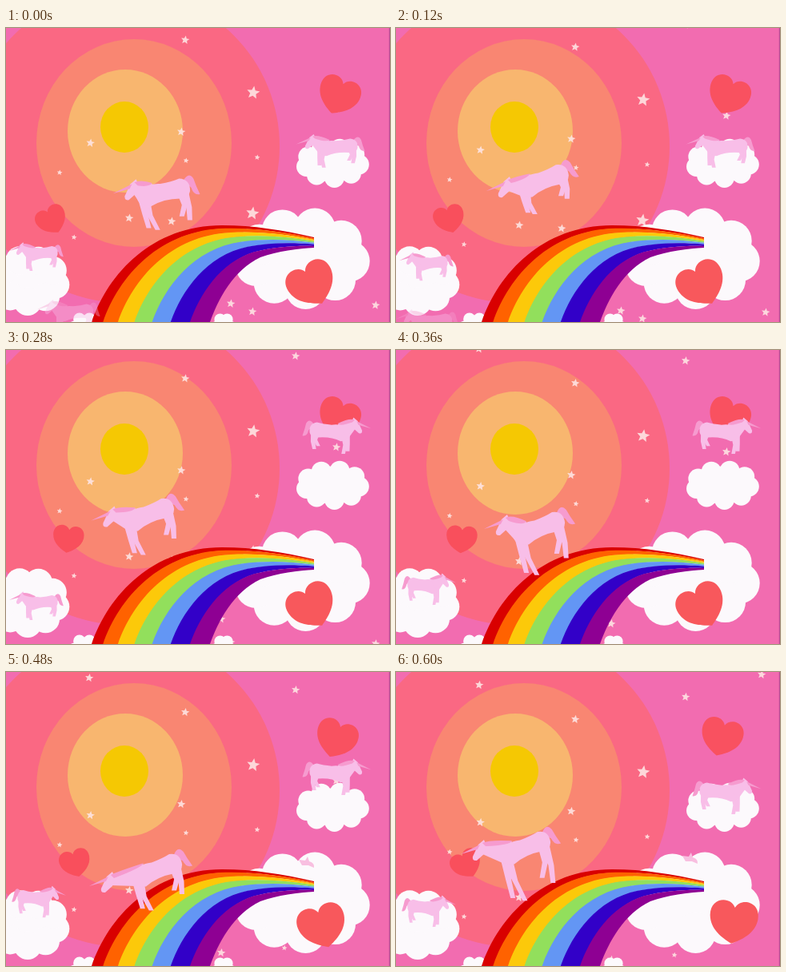
These frames come from a looping animation (480 by 368 pixels, 0.64 s). An HTML page:

```html
<!DOCTYPE html>
<html lang="en">
<head>
<meta charset="utf-8">
<title>Rainbow unicorns</title>
<style>
html, body { margin: 0; width: 100%; height: 100%; overflow: hidden; background: #f26cb0; }
svg { display: block; width: 100vw; height: 100vh; }
</style>
</head>
<body>
<svg id="stage" viewBox="0 0 480 368" preserveAspectRatio="none"></svg>
<script>
const NS = "http://www.w3.org/2000/svg";
const stage = document.getElementById("stage");
const LOOP = 640, STEP = 40, LAST = LOOP / STEP - 1;

function add(tag, attrs, parent = stage) {
  const el = document.createElementNS(NS, tag);
  for (const name in attrs) el.setAttribute(name, attrs[name]);
  return parent.appendChild(el);
}

const mix = (a, b, k) => a + (b - a) * k;
const rad = degrees => degrees * Math.PI / 180;
const ramp = (from, to, v) => Math.min(1, Math.max(0, (v - from) / (to - from)));
const place = (el, x, y, rest = "") => el.setAttribute("transform", `translate(${x},${y}) ${rest}`);
const show = (el, on) => el.setAttribute("visibility", on ? "visible" : "hidden");

// Sky
function disc(cx, cy, rx, ry, fill) {
  add("ellipse", { cx, cy, rx, ry, fill });
}
add("rect", { width: 480, height: 368, fill: "#f26cb0" });
disc(147, 148, 195, 196, "#fa6883");
disc(160, 144, 122, 130, "#f98672");
disc(149, 129, 72, 77, "#f8b66f");
disc(148, 124, 30, 32, "#f5c803");

// Stars fall at one common speed
const FALL = 2.95;
function starPath(r) {
  const points = Array.from({ length: 10 }, (_, i) => {
    const a = i * Math.PI / 5 - 1.42, d = i % 2 ? r * 0.45 : r;
    return `${d * Math.cos(a)},${d * Math.sin(a)}`;
  });
  return `M${points.join("L")}Z`;
}
function makeStars(r, places) {
  return places.map(([x, y]) =>
    ({ x, y, el: add("path", { d: starPath(r), fill: "#fde3e2", opacity: 0.9 }) }));
}
const stars = [
  ...makeStars(3.6, [[225, 166], [314, 162], [67, 181], [85, 262], [348, 310]]),
  ...makeStars(5.5, [[224, 15], [219, 130], [105.5, 144], [154, 238], [207, 242], [362, -13],
    [104, -28], [457, -41], [462, 347], [281, 345], [308, 355], [269, 316], [413, 101]]),
  ...makeStars(8.5, [[309, 81], [308, 232]])
];

const HEART = "M0,-17C-6,-31-32,-28-30,-5C-28,13-12,22 0,28C12,22 28,13 30,-5C32,-28 6,-31 0,-17Z";
const heart = fill => add("path", { d: HEART, fill });
const highHeart = heart("#f95160"), driftHeart = heart("#f94f5c");

// A cloud is an oval with a ring of lobes
function cloud(cx, cy, rx, ry, lobes, turn = 0) {
  const r = ry * 0.4;
  const g = add("g", { fill: "#fcf9fc" });
  add("ellipse", { cx, cy, rx: rx - r * 0.6, ry: ry - r * 0.6 }, g);
  for (let i = 0; i < lobes; i++) {
    const a = turn + i * 2 * Math.PI / lobes;
    add("circle", { cx: cx + (rx - r) * Math.cos(a), cy: cy + (ry - r) * Math.sin(a), r }, g);
  }
}
cloud(408, 169, 46, 31, 9, 0.1);
cloud(370, 288, 85, 64, 9, 0.1);
cloud(28, 316, 52, 44, 9, 0.2);
cloud(98, 374, 20, 19, 6);
cloud(272, 374, 16, 18, 6);

const peeker = add("path", { d: "M-9,-2L-1,-1L2,-6L4,0Q11,2 10,8L3,5L-5,5Z", fill: "#f8bfe0" });
const lowHeart = heart("#f8585c");

// Rainbow: each edge blends the outer and the inner curve
const outer = [107, 368, 128, 307, 183, 247, 270, 247, 310, 247, 345, 253, 385, 262];
const inner = [255, 368, 265, 340, 284, 303, 318, 287, 340, 279, 365, 276, 385, 275];
const edge = i => outer.map((v, j) => mix(v, inner[j], (i / 7) ** 1.2));
const curve = p => `${p[0]},${p[1]}C${p.slice(2)}`;
const backwards = p => p.map((_, i) => p[p.length - 2 - i + 2 * (i % 2)]);
["#d90000", "#ff6200", "#fcc90a", "#92df5c", "#6396f4", "#3200c8", "#8e0093"].forEach((fill, i) => {
  const lower = edge(Math.min(7, i + 1.05));
  add("path", { fill, d: `M${curve(edge(i))}L${curve(backwards(lower))}Z` });
});

// Unicorn facing left, posed by body centre, tilt, head offset and leg reach
function unicorn(opacity = 1) {
  const g = add("g", { opacity });
  const part = fill => add("path", { fill }, g);
  const skin = "#f8bee8", pink = "#f69bcf";
  const tail = part(pink);
  const legs = Array.from({ length: 4 }, () => part(skin));
  const torso = part(skin), neck = part(skin), head = part(skin);
  const mane = part(pink), horn = part(pink);
  const draw = (el, d) => el.setAttribute("d", d);

  function leg(el, [x, y], swing, length, bend) {
    const fx = x + Math.sin(rad(swing)) * length, fy = y + Math.cos(rad(swing)) * length;
    const kx = mix(x, fx, 0.55) + bend, ky = mix(y, fy, 0.55);
    draw(el, `M${x - 8},${y}L${x + 7},${y}L${kx + 3.5},${ky}L${fx + 3},${fy}` +
      `L${fx - 3},${fy}L${kx - 3.5},${ky}Z`);
  }

  function pose({ x, y, tilt, hx, hy, reach, swing }) {
    const c = Math.cos(rad(tilt)), s = Math.sin(rad(tilt));
    const at = (a, b) => [x + a * c - b * s, y + a * s + b * c];
    const fore = at(-22, 4), hind = at(27, 1);
    const near = (a, b) => [fore[0] + hx + a, fore[1] + hy + b];

    leg(legs[0], fore, swing, reach, -2);
    leg(legs[1], fore, swing - 14, reach * 0.88, -2);
    leg(legs[2], hind, swing * 0.6, reach * 0.85, 3);
    leg(legs[3], hind, swing * 0.6 - 16, reach * 0.72, 3);
    draw(torso, `M${at(-31, -2)}Q${at(-18, -14)} ${at(0, -11)}Q${at(14, -12)} ${at(24, -15)}` +
      `Q${at(38, -13)} ${at(36, 2)}Q${at(33, 12)} ${at(23, 10)}Q${at(2, 8)} ${at(-15, 16)}` +
      `Q${at(-33, 14)} ${at(-31, -2)}Z`);
    draw(neck, `M${near(1, -4)}L${at(-10, -12)}L${at(-27, 12)}L${near(-1, 8)}Z`);
    draw(head, `M${near(3, -9)}L${near(-4, -3)}L${near(-11, 12)}Q${near(-12, 18)} ${near(-6, 17)}` +
      `L${near(3, 9)}L${near(6, -2)}Z`);
    draw(mane, `M${near(1, -5)}Q${near(9, -9)} ${at(-10, -13)}Q${at(-14, -8)} ${near(5, -1)}Z`);
    draw(horn, `M${near(-2, -3)}L${near(-26, 9)}L${near(-5, 3)}Z`);
    draw(tail, `M${at(29, -12)}Q${at(37, -23)} ${at(42, -13)}Q${at(44, -4)} ${at(48, 7)}` +
      `Q${at(40, 8)} ${at(38, -2)}Q${at(36, -6)} ${at(31, -4)}Z`);
  }
  return { g, pose };
}

function rider(opacity) {
  const u = unicorn(opacity);
  u.pose({ x: 0, y: 0, tilt: 0, hx: -17, hy: -18, reach: 33, swing: 5 });
  return u.g;
}
const highRider = rider(1), lowRider = rider(1), ghost = rider(0.4);
const runner = unicorn();

// Leap key poses: step, body x, y, leg reach, head x, y
const leap = [
  [0, 194, 206, 44, -13, -14],
  [2, 184, 193, 34, -20, -7],
  [5, 174, 190, 34, -25, -6],
  [9, 176, 224, 52, -20, -19],
  [12, 185, 249, 43, -35, 0],
  [15, 158, 221, 60, -31, -12]
];
function leapPose(step) {
  const i = Math.max(1, leap.findIndex(row => row[0] >= step));
  const from = leap[i - 1], to = leap[i];
  const k = ramp(from[0], to[0], step);
  const [, x, y, reach, hx, hy] = from.map((v, j) => mix(v, to[j], k));
  return { x, y, reach, hx, hy, swing: 23, tilt: -16 + 10 * Math.exp(-step) };
}

add("rect", { x: 478.8, width: 1.2, height: 368, fill: "#b84a94" });

function drawHearts(step) {
  const glide = ramp(9, LAST, step) ** 1.6;
  const wave = Math.cos(2 * Math.PI * step / LAST);
  place(highHeart, 416 - 9 * glide, 84 - 3 * glide, `rotate(${22 - 7 * glide}) scale(0.87)`);
  place(driftHeart, 57 + 31 * Math.sin(Math.PI / 2 * step / LAST), 238 + 2 * wave,
    `rotate(${-10 - 18 * wave}) scale(0.64)`);
  place(lowHeart, 382 + 40 * glide, 320 - 8 * glide, `rotate(${-28 + 34 * glide})`);
}

function drawRiders(step) {
  if (step < 4) place(highRider, 412, 149, "scale(0.76,0.7)");
  else place(highRider, 407, 102 + 8 * Math.max(0, step - 9), "scale(-0.76,0.76)");

  if (step < 8) place(lowRider, 43, 282 + 34 * ramp(0, 5, step) ** 2, "scale(0.6)");
  else place(lowRider, 36, 283 + 1.3 * (step - 12) ** 2, "scale(-0.6,0.66)");

  show(ghost, step < 4);
  place(ghost, 84 - 13 * step, 356 + 4 * step, "scale(0.7)");
  show(peeker, step > 10);
  place(peeker, 375 - 2.7 * (step - 12), 237 - 1.7 * (step - 12));
}

function tick() {
  const step = Math.floor(performance.now() % LOOP / STEP);
  stars.forEach(({ el, x, y }) => place(el, x, y + FALL * step));
  drawHearts(step);
  drawRiders(step);
  runner.pose(leapPose(step));
  requestAnimationFrame(tick);
}
tick();
</script>
</body>
</html>
```
